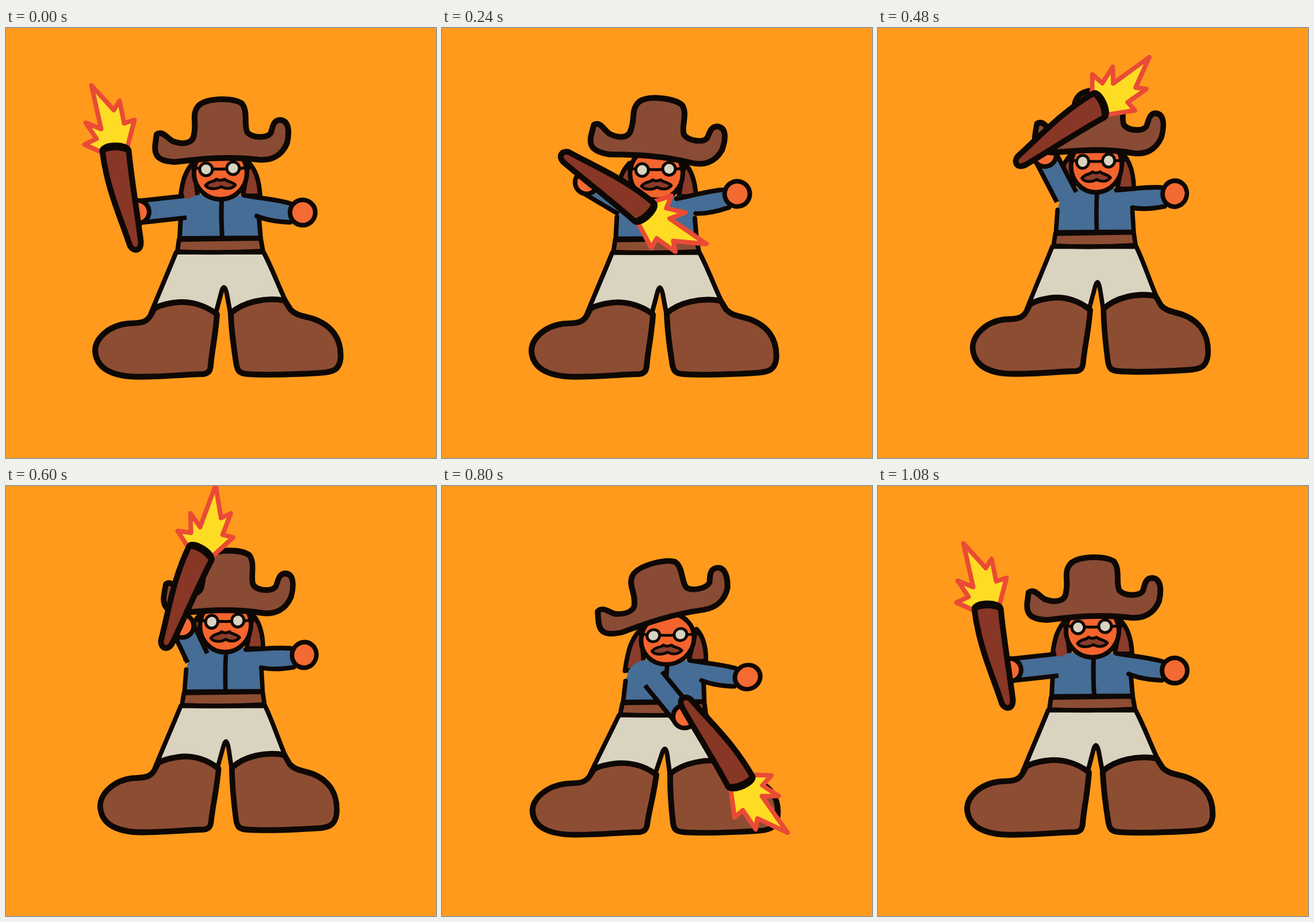
Write an HTML page that moves like this. It is 748 px wide and 748 px high and loops after 1.12 s.

```html
<!DOCTYPE html>
<html lang="en">
<head>
<meta charset="utf-8">
<title>Torch swing</title>
<style>
html, body { margin: 0; width: 100%; height: 100%; overflow: hidden; background: #ff9a1c; }
svg { display: block; width: 100vw; height: 100vh; }
.ink { stroke: #0e0805; stroke-width: 8; stroke-linejoin: round; stroke-linecap: round; }
.line { fill: none; }
.thin { stroke-width: 5; }
.thick { stroke-width: 10; }
.leather { fill: #8d4d33; }
.hat { fill: #8a4b35; }
.hair { fill: #8b3c2b; }
.torch { fill: #883626; }
.cloth { fill: #dad3c0; }
.shirt { fill: #456d96; }
.skin { fill: #f46a33; }
.yellow { fill: #ffdf2b; }
.white { fill: #fefefe; }
.orange { fill: #f56f36; }
.flame { fill: #ffdc24; stroke: #ea4b35; stroke-width: 8; stroke-linejoin: round; }
</style>
</head>
<body>
<svg viewBox="0 0 748 748">
  <g class="body">
    <path class="ink hair" d="M326 234 C310 250 305 272 302 310 L335 304 Z M422 234 C436 248 441 272 442 292 L412 292 Z"/>
    <path class="ink cloth" d="M296 390 C284 420 270 452 252 496 L300 482 L364 500 L374 462 Q379 440 384 462 L391 500 L440 474 L486 474 C472 444 462 416 448 390 Z"/>
    <path class="ink leather thick" d="M252 499 C244 514 232 513 212 514 C178 518 155 540 155 562 C157 588 176 602 214 606 C250 609 300 603 343 602 C352 601 355 597 356 588 C358 560 364 540 367 498 C345 481 320 476 300 477 C280 479 266 483 258 488 Z"/>
    <path class="ink leather thick" d="M391 496 C392 525 396 555 400 580 C402 597 406 601 420 602 C460 605 510 602 545 600 C570 599 580 594 582 575 C584 540 566 517 535 506 C515 500 505 500 495 490 L485 474 C450 468 412 477 391 496 Z"/>
    <path class="ink leather" d="M301 368 L443 366 L447 388 Q370 392 298 389 Z"/>
    <path class="shirt" d="M335 290 Q316 294 308 310 L304 330 L302 367 L443 366 L438 326 L425 291 Z"/>
    <path class="ink line" d="M304 328 L302 366 L443 365 L440 330"/>
    <path class="ink line" d="M375 300 Q374 330 376 364"/>
    <g id="farArm">
      <path class="shirt" d="M410 291 L494 306 V337 L436 328 L412 332 Z"/>
      <path class="ink line" d="M414 291 C440 296 465 297 494 305 M436 327 C452 334 470 337 494 338"/>
      <circle class="ink skin" cx="516" cy="321" r="22"/>
    </g>
  </g>

  <line id="sleeveInk" stroke="#0e0805" stroke-width="46"/>
  <line id="sleeve" stroke="#456d96" stroke-width="30" stroke-linecap="round"/>
  <circle id="hand" class="ink skin" r="20"/>

  <g class="body">
    <ellipse class="ink" fill="#f4642d" cx="373" cy="252" rx="46" ry="46"/>
    <path class="ink line thin" d="M320 243 Q372 248 424 243"/>
    <circle class="ink cloth thin" cx="348" cy="246" r="11"/>
    <circle class="ink cloth thin" cx="395" cy="244" r="11"/>
    <path class="ink hair thin" d="M347 274 C355 264 362 269 366 263 Q373 267 380 263 C386 268 394 267 399 273 C392 281 382 280 374 276 C366 281 352 281 347 274 Z"/>
    <path id="hat" class="ink hat thick" d="M262 185 C272 178 280 191 290 197 C310 204 326 200 327 185 C332 165 322 150 335 135 C350 121 395 121 410 131 C422 145 413 170 420 182 C430 192 455 192 461 182 C464 170 466 160 477 160 C493 161 493 182 489 200 C480 222 462 231 440 229 C380 222 330 229 295 233 C262 232 257 220 260 200 Z"/>
  </g>

  <g id="torch">
    <path class="flame" d="M166 216 L137 203 L158 193 L139 165 L166 176 L149 100 L188 143 L198 127 L206 166 L224 160 L212 206 Z"/>
    <path class="ink torch thick" d="M168 214 C168 202 212 201 214 214 C218 260 230 330 235 372 C236 389 222 390 216 379 C200 330 176 280 168 214 Z"/>
    <path class="ink line thick" d="M170 212 Q190 204 212 212"/>
  </g>

  <g id="thrust">
    <path class="torch" d="M262 221 C290 221 322 238 330 258 Q334 275 322 285 C300 290 270 300 250 303 L228 297 Q236 258 262 221 Z"/>
    <path class="ink line" d="M262 221 L236 286 M316 234 Q330 246 328 262 M256 302 Q290 296 322 290"/>
    <path class="orange" d="M108 276 C70 282 55 300 61 330 C72 390 100 420 122 455 C150 490 200 507 228 502 C232 490 225 482 216 473 C260 495 320 503 354 493 C352 470 320 445 296 431 L332 430 C337 400 300 370 278 340 C260 318 250 308 230 300 C190 292 150 285 108 276 Z"/>
    <path class="yellow" d="M146 315 C200 318 252 360 271 399 Q255 403 240 397 Q272 430 271 450 C240 447 220 437 200 432 L185 447 C160 430 130 400 120 370 Z"/>
    <path class="white" d="M91 313 Q110 298 132 302 Q150 316 158 334 C200 360 230 392 247 414 C200 424 150 385 125 364 Q100 337 91 313 Z"/>
    <path class="ink line" d="M97 273 Q130 276 150 282 L226 296 M245 317 Q205 390 187 436"/>
  </g>

  <path id="arc" class="yellow" d="M428 98 Q350 108 275 133 Q235 155 214 186 Q180 230 170 300 Q170 340 186 360 Q195 440 260 497 L420 575 Q470 592 515 584 L500 540 L350 396 C325 360 306 300 305 225 L322 203 L320 180 Q345 140 428 98 Z"/>
  <path id="glare" class="white" d="M245 271 Q234 285 232 322 Q222 345 226 390 Q226 440 260 497 Q285 535 310 543 Q345 550 368 560 C420 580 480 588 525 577 Q558 565 567 525 Q535 527 500 516 Q455 490 415 445 Q390 390 350 372 L351 396 Q305 365 288 325 Q265 305 245 271 Z"/>
</svg>

<script>
const LOOP = 1120, STEP = 40;
const $ = id => document.getElementById(id);
const bodies = document.querySelectorAll('.body');

// grip: how far up the torch the hand holds it; turn: torch angle in degrees.
const rest = {
  wide: 1, tall: 1, lift: 0, lean: 0, hatX: 0, hatY: 0, hatTilt: 0, farArm: 0,
  shoulderX: 312, shoulderY: 311, handX: 229, handY: 320, grip: 61, turn: 0
};
const windUp = {
  ...rest, wide: 1.011, tall: .986, lift: 1, hatX: -5, hatY: -4, hatTilt: 8, farArm: -19,
  shoulderY: 315, handX: 230, handY: 290, turn: -140
};
const raise = {
  ...windUp, wide: .984, tall: 1.008, lift: -1, hatTilt: 7, farArm: -23,
  shoulderX: 322, shoulderY: 300, handX: 273, handY: 247, turn: -305.5
};
const aim = {
  ...rest, wide: .959, tall: 1.023, lift: -5, lean: .02, hatTilt: 2, farArm: -13,
  shoulderX: 328, shoulderY: 294, handX: 290, handY: 221, grip: 46, turn: -293.5
};
const strike = {
  ...rest, tall: .96, lean: .064, shoulderX: 368, shoulderY: 335,
  handX: 422, handY: 401, grip: 25, turn: -562.5
};
const settle = { ...strike, lean: .055, hatX: -5, hatY: -13, hatTilt: -14.7 };

const smooth = f => f * f * (3 - 2 * f);
const whip = f => f ** 3;
const timeline = [
  { at: 0, pose: rest },
  { at: 160, pose: windUp, ease: smooth },
  { at: 320, pose: raise, ease: smooth },
  { at: 480, pose: aim, ease: smooth },
  { at: 720, pose: strike, ease: whip },
  { at: 800, pose: settle, ease: smooth },
  { at: 1080, pose: { ...rest, turn: -720 }, ease: smooth }
];

function poseAt(t) {
  const next = timeline.findIndex(k => k.at > t);
  if (next < 0) return rest;
  const a = timeline[next - 1], b = timeline[next];
  const f = b.ease((t - a.at) / (b.at - a.at));
  const pose = {};
  for (const k in rest) pose[k] = a.pose[k] + (b.pose[k] - a.pose[k]) * f;
  return pose;
}

const set = (el, attrs) => Object.entries(attrs).forEach(([k, v]) => el.setAttribute(k, v));
const show = (id, on) => set($(id), { visibility: on ? 'visible' : 'hidden' });
const shrink = (id, x, y, size, angle = 0) => set($(id), {
  transform: `translate(${x} ${y}) rotate(${angle}) scale(${size}) translate(${-x} ${-y})`
});

function draw(t) {
  const p = poseAt(t);
  bodies.forEach(b => set(b, {
    transform: `translate(369 ${605 + p.lift}) matrix(${p.wide} 0 ${-p.lean} ${p.tall} 0 0) translate(-369 -605)`
  }));
  set($('hat'), { transform: `translate(${p.hatX} ${p.hatY}) rotate(${p.hatTilt} 374 232)` });
  set($('farArm'), { transform: `rotate(${p.farArm} 425 310)` });

  const arm = { x1: p.shoulderX, y1: p.shoulderY, x2: p.handX, y2: p.handY };
  set($('sleeveInk'), arm);
  set($('sleeve'), arm);
  set($('hand'), { cx: p.handX, cy: p.handY });

  const gripX = 242.6 - .216 * p.grip, gripY = 379.8 - .976 * p.grip;
  set($('torch'), {
    transform: `translate(${p.handX} ${p.handY}) rotate(${p.turn}) translate(${-gripX} ${-gripY})`
  });

  // The smears grow in from the top of the swing and die away at the flame.
  show('torch', t !== 160);
  show('thrust', t === 160);
  show('arc', t >= 640 && t <= 720);
  show('glare', t >= 680 && t <= 760);
  const early = Math.max(0, 680 - t) / 40, late = Math.max(0, t - 720) / 40;
  shrink('arc', 428, 98, 1 - .3 * early, 25 * early);
  shrink('glare', 560, 545, 1 - .6 * late);
}

const start = performance.now();
function tick() {
  const ms = (performance.now() - start) % LOOP;
  draw(Math.floor(ms / STEP) * STEP);
  requestAnimationFrame(tick);
}
tick();
</script>
</body>
</html>
```
